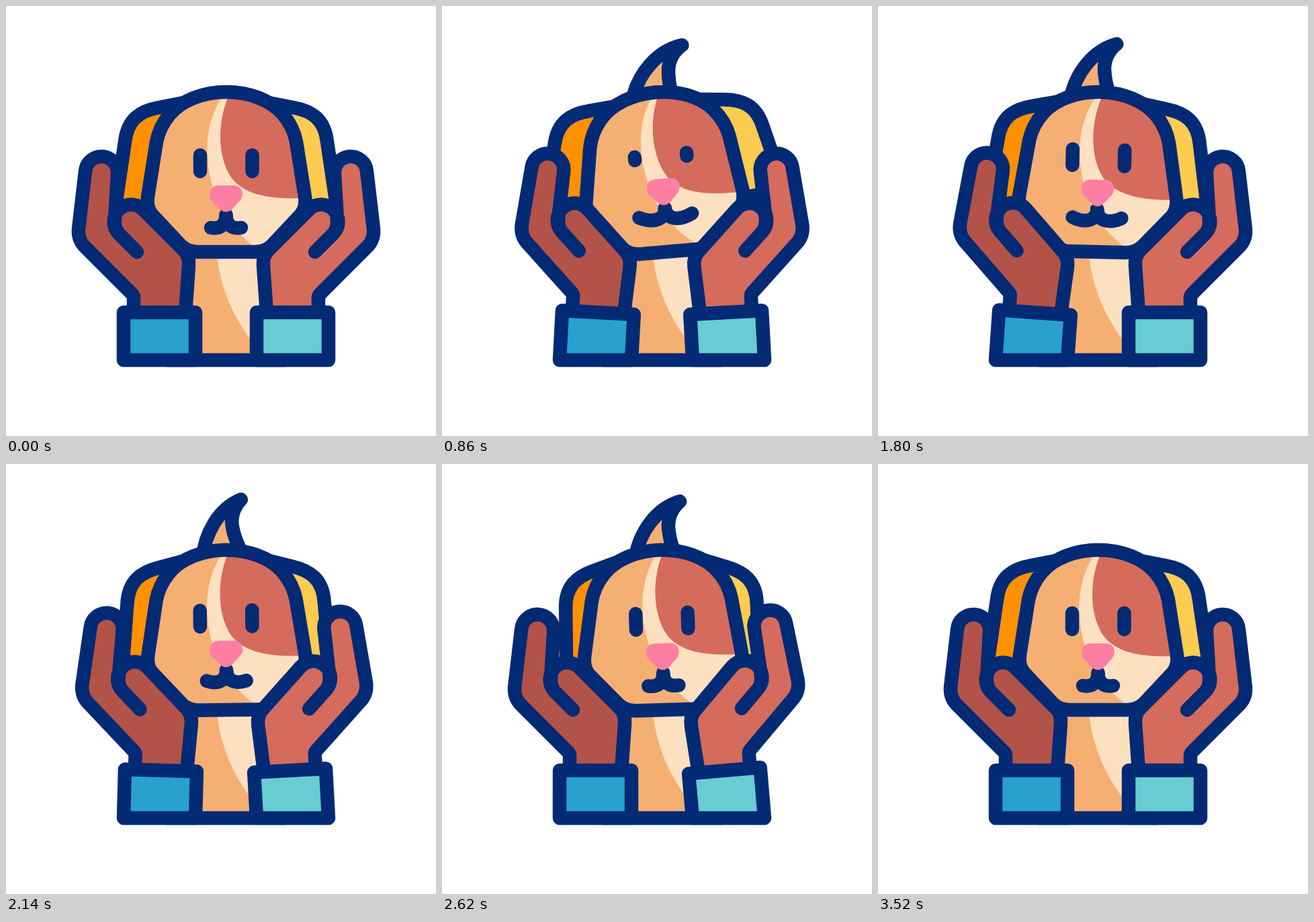
An HTML page with a canvas for the animation above (3600 ms loop, 640 by 640 pixels).

```html
<!DOCTYPE html>
<html lang="en">
<head>
<meta charset="utf-8">
<title>Happy dog</title>
<style>
  html, body { margin: 0; width: 100%; height: 100%; overflow: hidden; background: #fff; }
  canvas { display: block; width: 640px; height: 640px; }
</style>
</head>
<body>
<canvas id="stage" width="640" height="640"></canvas>
<script>
const ctx = document.getElementById('stage').getContext('2d');
const LOOP = 3600;
const BEAT = 560;      // time between two strokes of the same hand
const WAG = 302;
const INK = '#032a75', FUR = '#f6af73', CREAM = '#fce0bf', ROSE = '#d56b5c';

const headPath = new Path2D(`M328 128C294 128 262 140 244 161C233 174 227 186 224 202
  L211 284Q209 300 217 310L260 356Q270 366 286 366H370Q386 366 396 356L439 310
  Q447 300 445 284L432 202C429 186 423 174 412 161C394 140 362 128 328 128Z`);
const furPath = new Path2D('M322 134C296 175 296 220 304 255C312 295 332 330 372 360L180 380V100Z');
const patchPath = new Path2D('M331 134C314 175 315 225 335 255C355 282 395 288 445 286L470 100H331Z');
const nosePath = new Path2D(`M316 267H339Q352 268 352 281Q351 288 345 293L337 302
  Q327 311 318 302L309 293Q303 288 303 281Q303 268 316 267Z`);
const earPath = new Path2D('M290 139L228 151C200 156 181 168 177 202L164 290Q164 300 174 300H240L260 150Z');
const handPath = new Path2D(`M190 458V434Q190 431 188 429L116 357Q107 347 108 332L118 246
  A24 24 0 0 1 166 250L162 318Q161 331 168 339L195 366L168 339A25 25 0 0 1 204 303
  L265 364Q273 373 272 386L267 458`);
const tailPath = new Path2D('M278 170L285 134C294 100 320 66 357 58Q338 72 337 95Q337 112 342 130V170');
const chestPath = new Path2D('M313 366C319 420 338 465 372 507H392V366Z');

const clamp01 = x => Math.min(1, Math.max(0, x));
const ease = x => (1 - Math.cos(Math.PI * clamp01(x))) / 2;
const ramp = (t, from, to) => ease((t - from) / (to - from));
const bump = (t, peak, half) => ease(1 - Math.abs(t - peak) / half);

// A hand first squeezes and holds, then strokes the cheek once per beat.
function handAngle(t, release, firstStroke, strokes) {
  let angle = .054 * (ramp(t, 0, 480) - ramp(t, release, release + 300));
  for (let i = 0; i < strokes; i++) angle += .088 * bump(t, firstStroke + i * BEAT, 240);
  return angle;
}

function poseAt(t) {
  const left = handAngle(t, 1460, 1730, 3);
  const right = handAngle(t, 1430, 2040, 2);
  const cheer = ramp(t, 0, 600) - ramp(t, 1340, 1700);
  const droop = ramp(t, 1700, 2600) - ramp(t, 2620, 3040);
  const earLift = .1 * cheer - .13 * droop;
  return {
    left, right,
    head: (left - right) / 3 - .085 * cheer,
    leftEar: earLift + .04 * bump(t, 3150, 370),
    rightEar: earLift + .1 * bump(t, 3290, 230),
    joy: ramp(t, 160, 600) - ramp(t, 1460, 2680),
    eyeOpen: clamp01(Math.abs(t - 880) / 100),
    tailDrop: 80 * (1 - ramp(t, 160, 460) + ramp(t, 2780, 3180)),
    tailAngle: -.18 + .19 * Math.cos(2 * Math.PI * (t - 1460) / WAG)
  };
}

function group(draw) {
  ctx.save();
  draw();
  ctx.restore();
}

function rotateAbout(x, y, angle) {
  ctx.translate(x, y);
  ctx.rotate(angle);
  ctx.translate(-x, -y);
}

function mirror() {
  ctx.translate(655, 0);
  ctx.scale(-1, 1);
}

function fill(path, color) {
  ctx.fillStyle = color;
  ctx.fill(path);
}

function outlined(path, color) {
  fill(path, color);
  ctx.stroke(path);
}

function tail(angle, drop) {
  group(() => {
    ctx.translate(0, drop);
    rotateAbout(325, 95, angle);
    outlined(tailPath, FUR);
  });
}

function ear(lift, color, flip) {
  group(() => {
    if (flip) mirror();
    rotateAbout(265, 145, lift);
    outlined(earPath, color);
  });
}

function face(joy, eyeOpen) {
  const half = 12 * eyeOpen + .01;
  const width = 22.5 + 17 * joy;
  ctx.translate(0, -10 * joy);
  for (const x of [289, 366.5]) ctx.stroke(new Path2D(`M${x} ${234 - half}V${234 + half}`));
  for (const side of [-1, 1]) {
    const reach = side * width;
    ctx.stroke(new Path2D(`M${327.5 + reach} ${330 - 8 * joy}
      C${327.5 + reach * .45} ${332 + joy} 327.5 327 327.5 311`));
  }
  fill(nosePath, '#ff7ea3');
}

function head(joy, eyeOpen) {
  group(() => {
    ctx.clip(headPath);
    fill(headPath, CREAM);
    fill(furPath, FUR);
    fill(patchPath, ROSE);
  });
  ctx.stroke(headPath);
  group(() => face(joy, eyeOpen));
}

function body() {
  ctx.fillStyle = FUR;
  ctx.fillRect(265, 360, 125, 167);
  fill(chestPath, CREAM);
  ctx.stroke(new Path2D('M240 527H415'));
}

// The cuff keeps its lower edge while its upper edge turns with the hand.
function arm(angle, skin, cloth, flip) {
  group(() => {
    if (flip) mirror();
    group(() => {
      rotateAbout(229, 527, angle);
      outlined(handPath, skin);
    });
    const c = Math.cos(angle), s = Math.sin(angle);
    const top = dx => `${228.5 + dx * c + 71 * s} ${527 + dx * s - 71 * c}`;
    outlined(new Path2D(`M175 527L${top(-53.5)}L${top(53.5)}L282 527Z`), cloth);
  });
}

function render(t) {
  const pose = poseAt(t);
  ctx.fillStyle = '#fff';
  ctx.fillRect(0, 0, 640, 640);
  ctx.strokeStyle = INK;
  ctx.lineWidth = 20.5;
  ctx.lineCap = ctx.lineJoin = 'round';

  tail(pose.tailAngle, pose.tailDrop);
  body();
  group(() => {
    rotateAbout(328, 250, pose.head);
    ear(pose.leftEar, '#ff9100');
    ear(pose.rightEar, '#fccb50', true);
    head(pose.joy, pose.eyeOpen);
  });
  arm(pose.left, '#b35248', '#28a1cf');
  arm(pose.right, ROSE, '#67cdd2', true);
}

let start;
function tick(now) {
  start ??= now;
  render((now - start) % LOOP);
  requestAnimationFrame(tick);
}
render(0);
requestAnimationFrame(tick);
</script>
</body>
</html>
```
